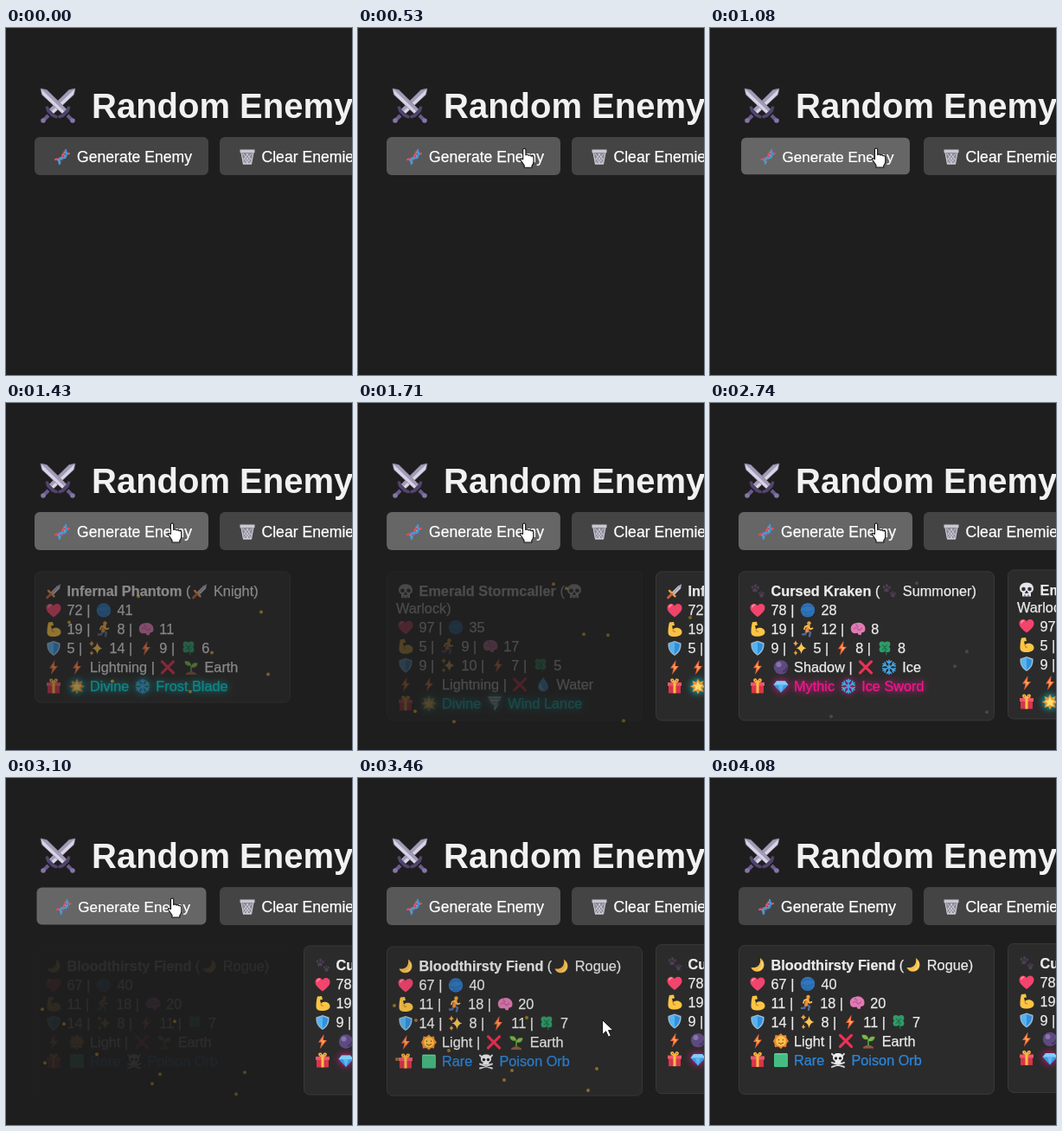
An HTML page that plays this animation: 400 by 401 pixels, repeating every 4140 ms.

```html
<!DOCTYPE html>
<html lang="en">
<head>
<meta charset="utf-8">
<title>Random Enemy</title>
<style>
html, body { margin: 0; width: 100%; height: 100%; overflow: hidden; background: #1e1e1e; }
#stage { position: relative; width: 400px; height: 401px; overflow: hidden; background: #1e1e1e;
  font-family: "Liberation Sans", Arial, sans-serif; }
.layer { position: absolute; left: 0; top: 0; }
.label { font-size: 17.6px; fill: #fff; stroke: #fff; stroke-width: .25px; }
.card { position: absolute; left: 0; top: 0; width: 296px; box-sizing: border-box; }
.face { position: absolute; inset: 0; box-sizing: border-box; padding: 11px 10px 0;
  border: 1px solid #393939; border-radius: 7px; background: #2b2b2b; color: #ececec; font-size: 16.3px;
  -webkit-text-stroke: .25px; }
.row { height: 22px; line-height: 22px; white-space: pre; }
.row.wrap { height: 20px; line-height: 18px; }
.row svg { width: 22px; height: 20px; vertical-align: -4px; overflow: visible; }
.row i { font-style: normal; display: inline-block; height: 22px; }
.dot { position: absolute; width: 4.4px; height: 4.4px; margin: -2.2px; border-radius: 50%; }
</style>
</head>
<body>
<div id="stage">
<svg class="layer" width="400" height="401">
  <defs>
    <g id="h"><path d="M11 19C4 14 2.500 11 2.500 8 2.500 3 9 2 11 6c2-4 8.500-3 8.500 2 0 3-1.500 6-8.500 11z" fill="#f2446c"/><path d="M5 8q0-3 3-3" fill="none" stroke="#ff8fa8" stroke-width="1.500"/></g>
    <g id="o"><circle cx="11" cy="11" r="8.200" fill="#2f76bd"/><path d="M4 8q7-4 13-1M4 12q7 4 14-1M7 16q4 2 8 0" fill="none" stroke="#2a68ab" stroke-width="1.800"/></g>
    <g id="v"><circle cx="11" cy="11" r="8.200" fill="#5d4a80"/><circle cx="8.500" cy="8" r="3" fill="#8873ad"/><path d="M13 16a6 6 0 0 0 5-5" fill="none" stroke="#463463" stroke-width="2"/></g>
    <g id="m"><path d="M5 3l5-.5 1 4-3 .5 1 4c3-3 10-2 10.500 3 .3 4-4 5.500-9 5.500-4 0-7-1-7-5C3.500 10 4 6 5 3z" fill="#fcc544"/><path d="M9 11q0 3 3 3" fill="none" stroke="#d98c2b" stroke-width="1.300"/></g>
    <g id="r" fill="none" stroke-linecap="round" stroke-linejoin="round"><path d="M11 13l3 2-1 4M10 13l-2 4H5" stroke="#536a9b" stroke-width="2.400"/><path d="M12 7l-2 6" stroke="#f08a3c" stroke-width="3.800"/><path d="M12 8l2 3 2.500-1M11 7L8 8l-1 3" stroke="#fcc04c" stroke-width="1.700"/><circle cx="12.500" cy="4" r="2.200" fill="#e9a23c"/></g>
    <g id="b"><path d="M3 12c-1-4 2-8 6-8 5-2 11 2 10.500 7 0 3-2 4-4 4l-1 3-3-.5-1-2c-4 1-7 0-7.500-3.500z" fill="#e17bb4"/><path d="M6 11q3-3 5 0t5-2M9 5q0 3 3 3" fill="none" stroke="#b95a94" stroke-width="1.300"/></g>
    <g id="s"><path d="M11 2.500l7.500 2.500c.5 7-2 11-7.500 14.500C5.500 16 3 12 3.500 5z" fill="#9dbbd3"/><path d="M11 4l6 2.200c.2 5.300-1.800 8.500-6 11.800-4.200-3.300-6.200-6.500-6-11.800z" fill="#2f92df"/><path d="M11 4v14c-4.200-3.300-6.200-6.500-6-11.800z" fill="#55b4f2"/></g>
    <g id="p" fill="#fac552"><path d="M12.500 4q1 6 6 7-5 1-6 7-1-6-6-7 5-1 6-7z"/><path d="M6 2q.5 3 3 3.500Q6.500 6 6 9 5.500 6 3 5.500 5.500 5 6 2zM6 13.500q.5 2.500 2.500 3Q6.500 17 6 19.500 5.500 17 3.500 16.500q2-.5 2.500-3z" fill="#f5a142"/></g>
    <g id="z"><path d="M12.500 2.500L6 12h3.500L8 19.500 16 9.500h-4z" fill="#f4663c"/><path d="M11.500 6L8.500 11H11l-1 4 4-5h-3.500z" fill="#fcb352"/></g>
    <g id="c"><g fill="#2f9c68"><circle cx="8" cy="6.500" r="3.400"/><circle cx="14" cy="6.500" r="3.400"/><circle cx="8" cy="12.500" r="3.400"/><circle cx="14" cy="12.500" r="3.400"/></g><path d="M11 10l2 9M8 7l6 6M14 7l-6 6" stroke="#1e7550" stroke-width="1.200"/></g>
    <g id="x"><path d="M4.500 4.500l13 13M17.500 4.500l-13 13" stroke="#ef2f55" stroke-width="3.200" stroke-linecap="round"/></g>
    <g id="u"><path d="M11 2.500c3 5 6 7.500 6 11a6 6 0 0 1-12 0c0-3.500 3-6 6-11z" fill="#3ea4ee"/><path d="M8 11q-1 4 3 6" fill="none" stroke="#a5dcff" stroke-width="2"/></g>
    <g id="g"><path d="M4 10h14v9H4z" fill="#d8354a"/><path d="M3 6.500h16v4H3z" fill="#f2556a"/><path d="M9.500 6.500h3V19h-3z" fill="#fcc044"/><path d="M11 6.500C6 6 6 2 9 3l2 3 2-3c3-1 3 3-2 3.500z" fill="none" stroke="#fcb23c" stroke-width="1.700"/></g>
    <g id="a"><path d="M11 2l2 4 4.500-1.500L16 9l4 2-4 2 1.500 4.500L13 16l-2 4-2-4-4.500 1.500L6 13l-4-2 4-2-1.500-4.500L9 6z" fill="#e99a3b"/><path d="M11 5l1.800 4 4.200.4-3.200 2.800 1.100 4.200L11 14.200l-3.900 2.200 1.100-4.200L5 9.400 9.200 9z" fill="#ffdf70"/></g>
    <g id="y"><path d="M3 3h16l-2 4-3 3 1 3-4 6.500-1-3 1-3-4-3-2-4z" fill="#c3ced7"/><path d="M4 5.500h14M7 9.500h8M11 13h3" stroke="#768999" stroke-width="1.200"/></g>
    <g id="j"><path d="M11 3c5 0 8 3 8 7 0 3-2 4-3 4.500V19H6v-4.500C5 14 3 13 3 10c0-4 3-7 8-7z" fill="#e6e3ea"/><circle cx="7.500" cy="10.500" r="2.300" fill="#33303a"/><circle cx="14.500" cy="10.500" r="2.300" fill="#33303a"/><path d="M11 12.500l1.500 2.500h-3zM9 17v2m4-2v2" fill="#33303a" stroke="#33303a"/></g>
    <g id="k"><path d="M4 14l14 5m0-5L4 19M4 4l2 2m12-2l-2 2" stroke="#d6d6dc" stroke-width="2" stroke-linecap="round"/><path d="M11 3c4 0 6 2 6 5.500 0 2-1 3-2.500 3.500v3h-7v-3C6 11.500 5 10.500 5 8.500 5 5 7 3 11 3z" fill="#ececf0"/><circle cx="8.500" cy="9" r="1.700" fill="#222"/><circle cx="13.500" cy="9" r="1.700" fill="#222"/></g>
    <g id="w" fill="#4d3d54"><ellipse cx="8.500" cy="5" rx="1.500" ry="2"/><ellipse cx="5" cy="6.500" rx="1.300" ry="1.800"/><ellipse cx="11.500" cy="7" rx="1.300" ry="1.800"/><path d="M8 7.500c2.500 0 4 4 1.500 4.500-1.500-.5-2 .5-3 0C4 11.500 5.500 7.500 8 7.500z"/><circle cx="15.500" cy="16" r="2.300"/><circle cx="13" cy="13.500" r="1.100"/><circle cx="15.500" cy="12.300" r="1.100"/><circle cx="18" cy="13.500" r="1.100"/></g>
    <g id="n"><path d="M14 3c6 4 6 12 0 15-4 2-9 0-10.500-4C12 15 15 10 14 3z" fill="#f9bd4a"/><path d="M16 7c2 4 0 9-4 10" fill="none" stroke="#ffdc80" stroke-width="1.300"/></g>
    <g id="f" fill="none" stroke="#42a9ec" stroke-width="1.600" stroke-linecap="round"><path id="arm" d="M11 3v16M8.500 4l2.500 2.500L13.500 4M8.500 18l2.500-2.500 2.500 2.500"/><use href="#arm" transform="rotate(60 11 11)"/><use href="#arm" transform="rotate(120 11 11)"/></g>
    <g id="d"><path d="M6 5h10l3.500 4.500L11 18.500 2.500 9.500z" fill="#3b9be8"/><path d="M6 5h10l3.500 4.500h-17z" fill="#7fcdf8"/><path d="M8 9.500h6l-3 9z" fill="#61b6f2"/></g>
    <g id="l"><path d="M11 2l2.500 2.500L17 4l.5 3.500L20 11l-2.500 3-.5 4-3.500-.5L11 20l-3-2.500-4 .5-.5-4L2 11l2-3.500L4.500 4 8 4.500z" fill="#ee8530"/><circle cx="11" cy="11" r="6" fill="#fcc148"/><path d="M8.500 9v1.500m5-1.500v1.500M8 13q3 3 6 0" stroke="#754620" fill="none"/></g>
    <g id="e"><path d="M5 18q6-5 12 0v1.500H5z" fill="#8c5a44"/><path d="M11 16V9" stroke="#4d9b3a" stroke-width="1.800"/><path d="M11 9C6 10 3.500 8 3.500 4c5-1 7.500 1 7.500 5zm0 2c0-4 3-6 7.500-5 0 4-3 6-7.500 5z" fill="#5fb547"/><path d="M10 8L5 5m7 5l5-3" stroke="#e59d51"/></g>
    <g id="q"><rect x="3" y="3" width="16" height="16" rx="1.500" fill="#45bd82"/><path d="M4 4h14" stroke="#6fd6a2"/></g>
    <g id="t"><path d="M19 3l-1 5-8 8-3-3 8-8z" fill="#c8c5d4"/><path d="M19 3L8.500 14.500" stroke="#8f8aa3"/><path d="M5 10.500l6.500 6.500" stroke="#f0a24a" stroke-width="2.400" stroke-linecap="round"/><path d="M7.500 14.500L3.500 18.500" stroke="#c8643f" stroke-width="2.800" stroke-linecap="round"/></g>
    <g id="dna" fill="none" stroke-width="2.200" stroke-linecap="round"><path d="M5 14l4 3M13 5l5 3M8 12l3 2m1-6l3 3" stroke="#a9b9c8" stroke-width="1.100"/><path d="M3 14c4-2 8 2 8-3s3-5 8-4" stroke="#e04b62"/><path d="M8 19c-2-5 1-8 4-7s5-3 3-9" stroke="#3d9be0"/></g>
    <g id="bin"><path d="M3.500 5h15l-2.500 14H6z" fill="#8b8994"/><path d="M6 7l9 11M10 7l6 8M7 12l5 6M16 7l-9 11M12 7l-6 8M15 12l-5 6" stroke="#d5d3dd" stroke-width=".9"/><path d="M2.500 2.500h17v3.500h-17zM6 18h10v1.800H6z" fill="#c9c7d3"/><path d="M4 6l2.500 13M18 6l-2.500 13" stroke="#c9c7d3" stroke-width="1.200"/></g>
    <g id="sword"><path d="M0 0l7 1.500L30 24l-5 5L1.500 7z" fill="#d8d4e6"/><path d="M0 0l27.500 26.500L30 24 7 1.500z" fill="#a29cb5"/><path d="M0 0l7 1.500L30 24l-5 5L1.500 7z" fill="none" stroke="#77718c" stroke-width=".7"/><path d="M31 31l5 5" stroke="#6b5a8e" stroke-width="4"/><path d="M22 32.500l4-1.500 5-5 1.500-4" fill="none" stroke="#51446f" stroke-width="3.600" stroke-linecap="round" stroke-linejoin="round"/><circle cx="37" cy="37" r="2.800" fill="#8476a6"/></g>
  </defs>
  <use href="#sword" transform="translate(80 70) scale(-1 1)"/>
  <use href="#sword" transform="translate(40 70)"/>
  <text x="99" y="104" font-size="40" font-weight="bold" fill="#f1f1f1">Random Enemy</text>
  <g id="make">
    <rect id="plate" x="33" y="126" width="201" height="44" rx="6"/>
    <use href="#dna" x="54" y="138"/>
    <text class="label" x="82" y="155">Generate Enemy</text>
  </g>
  <rect x="247" y="126" width="190" height="44" rx="6" fill="#444"/>
  <use href="#bin" x="268" y="138"/>
  <text class="label" x="295.500" y="155">Clear Enemies</text>
</svg>
<div id="cards"></div>
<svg class="layer" width="400" height="401">
  <circle id="ring" cx="191" cy="138" r="15" fill="#cdbd2a" opacity=".8"/>
  <g id="cursor" stroke-linejoin="round">
    <path id="arrow" d="M0 0v17l4-3.800 2.800 6.300 3-1.300L7 12h5.500z" fill="#fff" stroke="#111"/>
    <path id="hand" d="M-1.500 1q1.500-2 3.200 0v6.500q2-1.500 3.200.500 2-1 3.200.8 2.200-.8 2.700 1.500v5q-.4 3-2 4.500V22H0v-2.500l-4.500-6.500q-.5-2.500 3-.5z" fill="#fff" stroke="#111" stroke-width="1.100"/>
  </g>
</svg>
</div>
<script>
const LOOP = 4140;
const $ = id => document.getElementById(id);
const clamp = x => Math.max(0, Math.min(1, x));
const ramp = (t, from, len) => clamp((t - from) / len);
const smooth = x => x * x * (3 - 2 * x);
const mix = (a, b, k) => a + (b - a) * k;

// Mouse button down and up times; a card is added on each release.
const clicks = [[920, 1250], [1530, 1640], [2140, 2250], [2950, 3080]];

const enemies = [
  { rows: ['~t <b>Infernal Phantom</b> (~t Knight)', '~h 72 | ~o 41', '~m 19 | ~r 8 | ~b 11',
      '~s 5 | ~p 14 | ~z 9 | ~c 6', '~z ~z Lightning | ~x ~e Earth', '~g <i>~a Divine ~f Frost Blade</i>'],
    tint: '#00eaea', glow: 1, dust: '#c8922a',
    dots: [[40, 60], [120, 30], [205, 95], [262, 48], [90, 128], [180, 140], [270, 120]] },
  { rows: ['~j <b>Emerald Stormcaller</b> (~j', 'Warlock)', '~h 97 | ~o 35', '~m 5 | ~r 9 | ~b 17',
      '~s 9 | ~p 10 | ~z 7 | ~c 5', '~z ~z Lightning | ~x ~u Water', '~g <i>~a Divine ~y Wind Lance</i>'],
    tint: '#00eaea', glow: 1, dust: '#c8922a',
    dots: [[193, 15], [208, 20], [228, 73], [256, 74], [78, 174], [274, 173], [33, 162]] },
  { rows: ['~w <b>Cursed Kraken</b> (~w Summoner)', '~h 78 | ~o 28', '~m 19 | ~r 12 | ~b 8',
      '~s 9 | ~p 5 | ~z 8 | ~c 8', '~z ~v Shadow | ~x ~f Ice', '~g <i>~d Mythic ~f Ice Sword</i>'],
    tint: '#f0178c', glow: 1, dust: '#666',
    dots: [[206, 21], [264, 100], [250, 117], [107, 175], [287, 170]] },
  { rows: ['~n <b>Bloodthirsty Fiend</b> (~n Rogue)', '~h 67 | ~o 40', '~m 11 | ~r 18 | ~b 20',
      '~s 14 | ~p 8 | ~z 11 | ~c 7', '~z ~l Light | ~x ~e Earth', '~g <i>~q Rare ~k Poison Orb</i>'],
    tint: '#2c86dc', glow: 0, dust: '#c8922a',
    dots: [[9, 73], [34, 90], [162, 87], [72, 125], [145, 148], [136, 159], [243, 146], [233, 171], [12, 135]] }
];

const icons = s => s.replace(/~(\w)/g, '<svg viewBox="0 1 22 20"><use href="#$1"/></svg>');

function buildCard(enemy) {
  const el = document.createElement('div');
  el.className = 'card';
  const rows = enemy.rows.map(r => `<div class="row${r[0] === '~' ? '' : ' wrap'}">${icons(r)}</div>`);
  const dots = enemy.dots.map(([x, y]) =>
    `<div class="dot" style="left:${x}px;top:${y}px;background:${enemy.dust}"></div>`);
  el.innerHTML = `<div class="face">${rows.join('')}</div>${dots.join('')}`;
  const loot = el.querySelector('i');
  loot.style.color = enemy.tint;
  if (enemy.glow) loot.style.filter = `drop-shadow(0 0 4px ${enemy.tint})`;
  $('cards').append(el);
  return { el, face: el.firstChild, dots: [...el.querySelectorAll('.dot')] };
}
const cards = enemies.map(buildCard);

function drawCard(card, i, t) {
  const age = t - clicks[i][1];
  card.el.style.display = age < 0 ? 'none' : '';
  if (age < 0) return;
  const slot = clicks.filter(c => c[1] <= t).length - 1 - i;
  const y = 192.7 + 1.8 * Math.cos(2 * Math.PI * (age - 300) / 3000);
  card.el.style.transform = `translate(${33 + 311 * slot}px, ${y}px)`;
  card.el.style.height = t < clicks[1][1] ? '152px' : '173px';
  card.face.style.opacity = 1 - Math.pow(1 - clamp(age / 500), 1.6);
  const p = clamp(age / 1000);
  const light = (1 - p) * (0.3 + 0.7 * clamp(age / 350));
  for (const dot of card.dots) {
    dot.style.transform = `translateY(${-30 * p * p}px)`;
    dot.style.opacity = light;
  }
}

function cursorAt(t) {
  if (t < 3330) {
    const k = smooth(ramp(t, 120, 420));
    return [mix(368, 192, k), mix(374, 139, k)];
  }
  if (t < 3460) {
    const k = Math.pow(ramp(t, 3330, 130), 1.3);
    return [mix(192, 282, k), mix(139, 279, k)];
  }
  const k = ramp(t, 3460, 200);
  return [mix(282, 402, k), mix(279, 404, k)];
}

function draw(t) {
  const hover = ramp(t, 430, 170) - ramp(t, 3390, 170);
  const shade = Math.round(mix(68, 102, hover));
  $('plate').setAttribute('fill', `rgb(${shade},${shade},${shade})`);

  const press = clicks.reduce((s, [a, b]) => s + smooth(ramp(t, a, 80)) - smooth(ramp(t, b, 80)), 0);
  $('make').setAttribute('transform', `translate(133.5 148) scale(${1 - 0.03 * press}) translate(-133.5 -148)`);
  $('ring').style.display = clicks.some(([a]) => t >= a && t < a + 140) ? '' : 'none';

  const [x, y] = cursorAt(t);
  const over = x < 234 && y < 170;
  $('cursor').style.display = t >= 120 && t < 3660 ? '' : 'none';
  $('cursor').setAttribute('transform', `translate(${x} ${y})`);
  $('hand').style.display = over ? '' : 'none';
  $('arrow').style.display = over ? 'none' : '';

  cards.forEach((card, i) => drawCard(card, i, t));
}

const start = performance.now();
function tick() {
  draw((performance.now() - start) % LOOP);
  requestAnimationFrame(tick);
}
tick();
</script>
</body>
</html>
```
